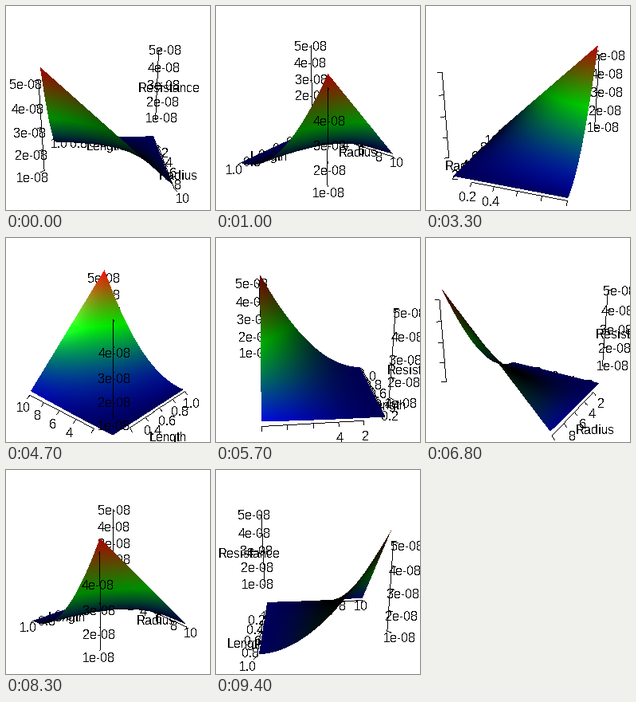
Write a matplotlib script that moves like this. It is 256 px wide and 256 px high and loops after 9.5 s.

```python
import numpy as np
import matplotlib.pyplot as plt
from matplotlib.animation import FuncAnimation

plt.rcParams.update({"text.antialiased": False, "text.hinting": "native",
                     "text.hinting_factor": 1})

SIZE = 256
FRAMES, INTERVAL = 95, 100
START, STEP = 87.7, 4.8              # camera azimuth in degrees
TILT = np.radians(20)
HALF_FOV = np.radians(15)
RADIUS = np.sqrt(3) / 2              # bounding sphere of the unit cube
DIST = RADIUS / np.sin(HALF_FOV)
NEAR, FAR = DIST - RADIUS, DIST + RADIUS
SCALE = SIZE / 2 / np.tan(HALF_FOV)
CX, CY = SIZE / 2, SIZE / 2 + 0.5
BOX = 0.515                          # half width of the axis box
TICK, LABEL, TITLE = 1.05, 1.15, 1.30
BASELINE = 7.5
LAYERS = 18

LENGTH = (0.02, 1.0)
RAD = (0.2, 10.0)
RES = (0.0, 5.5e-8)


def unit(value, bounds):
    return (value - bounds[0]) / (bounds[1] - bounds[0]) - 0.5


def camera(frame):
    """Right, up and towards-viewer vectors."""
    a = np.radians(START - STEP * frame)
    c, s = np.cos(a), np.sin(a)
    ct, st = np.cos(TILT), np.sin(TILT)
    return np.array([[-s, c, 0], [-c * st, -s * st, ct], [c * ct, s * ct, st]])


def project(points, cam):
    x, y, z = cam @ points
    depth = DIST - z
    return CX + SCALE * x / depth, CY - SCALE * y / depth, depth


def cubic_roots(a, b, c):
    """Real roots of s^3 + a s^2 + b s + c as three rows, nan where missing."""
    q = (a * a - 3 * b) / 9
    r = (2 * a ** 3 - 9 * a * b + 27 * c) / 54
    disc = r * r - q ** 3
    roots = np.full((3, a.size), np.nan)
    one = disc >= 0
    big = -np.sign(r[one]) * np.cbrt(np.abs(r[one]) + np.sqrt(disc[one]))
    roots[0, one] = big + q[one] / big
    three = ~one
    root_q = np.sqrt(q[three])
    angle = np.arccos(np.clip(r[three] / root_q ** 3, -1, 1))
    for k in range(3):
        roots[k, three] = -2 * root_q * np.cos((angle + 2 * np.pi * k) / 3)
    return roots - a / 3


# Cube coordinates to (length, radius / 10, height), where height = length * radius^2
SPAN = np.array([LENGTH[1] - LENGTH[0], (RAD[1] - RAD[0]) / 10, 1.0])
LOW = np.array([LENGTH[0], RAD[0] / 10, 0.0])

rows, cols = np.mgrid[0:SIZE, 0:SIZE] + 0.5
ray_x = (cols.ravel() - CX) / SCALE
ray_y = (CY - rows.ravel()) / SCALE


def shade_surface(cam):
    """Cast a ray through each pixel centre; the light sits at the viewer."""
    eye = (DIST * cam[2] + 0.5) * SPAN + LOW
    rays = np.outer(cam[0], ray_x) + np.outer(cam[1], ray_y) - cam[2][:, None]
    l1, b1, h1 = rays * SPAN[:, None]
    l0, b0, h0 = eye
    c0 = l0 * b0 ** 2 - h0
    c1 = 2 * l0 * b0 * b1 + l1 * b0 ** 2 - h1
    c2 = l0 * b1 ** 2 + 2 * l1 * b0 * b1
    c3 = l1 * b1 ** 2
    with np.errstate(all="ignore"):
        depth = 1 / cubic_roots(c1 / c0, c2 / c0, c3 / c0)
        length, rad = l0 + l1 * depth, b0 + b1 * depth
        inside = ((depth > NEAR) & (depth < FAR) & (length >= LENGTH[0])
                  & (length <= LENGTH[1]) & (rad >= LOW[1]) & (rad <= 1))
    zbuf = np.where(inside, depth, np.inf).min(axis=0)
    hit = np.isfinite(zbuf)
    t = zbuf[hit]
    length, rad = l0 + l1[hit] * t, b0 + b1[hit] * t
    height = length * rad ** 2

    normal = np.array([-rad ** 2 * SPAN[0], -2 * length * rad * SPAN[1], np.ones_like(t)])
    normal /= np.linalg.norm(normal, axis=0)
    side = -np.sign((normal * rays[:, hit]).sum(axis=0))
    light = np.clip(side * (cam[2] @ normal), 0, 1)
    mix = 2 * height - 1
    base = np.array([np.clip(mix, 0, 1), 1 - np.abs(mix), np.clip(-mix, 0, 1)])
    image = np.zeros((SIZE * SIZE, 4), dtype=np.uint8)
    image[hit, :3] = 255 * np.clip(base * light + light ** 50, 0, 1).T
    return image.reshape(SIZE, SIZE, 4), zbuf.reshape(SIZE, SIZE)


def draw_line(image, zbuf, x, y, depth):
    """One-pixel line between two points, hidden behind nearer pixels."""
    n = int(max(abs(x[1] - x[0]), abs(y[1] - y[0]))) + 1
    t = np.linspace(0, 1, n + 1)
    col, row = (np.floor(v[0] + (v[1] - v[0]) * t).astype(int) for v in (x, y))
    z = depth[0] + (depth[1] - depth[0]) * t
    ok = (col >= 0) & (col < SIZE) & (row >= 0) & (row < SIZE) & (z > NEAR) & (z < FAR)
    col, row, z = col[ok], row[ok], z[ok]
    front = z < zbuf[row, col]
    image[row[front], col[front], :3] = 0
    zbuf[row[front], col[front]] = z[front]


fig = plt.figure(figsize=(SIZE / 100, SIZE / 100), dpi=100, facecolor="white")
ax = fig.add_axes([0, 0, 1, 1])
ax.set_xlim(0, SIZE)
ax.set_ylim(SIZE, 0)
ax.axis("off")

# Depth slices of the picture, so that labels can stand between them
edges = np.linspace(NEAR, FAR, LAYERS + 1)
blank = np.zeros((SIZE, SIZE, 4), dtype=np.uint8)
layers = [ax.imshow(blank, extent=(0, SIZE, SIZE, 0), interpolation="nearest",
                    aspect="auto", zorder=-(lo + hi) / 2)
          for lo, hi in zip(edges[:-1], edges[1:])]

texts, lines = [], []


def add_text(string, pos):
    art = ax.text(0, 0, string, family="Liberation Sans", fontsize=11.52,
                  color="black", ha="left", va="baseline")
    width = art.get_window_extent(fig.canvas.get_renderer()).width
    texts.append((art, np.array(pos), width))


def add_axis(axis, sides, ticks, labels, title=None):
    """Axis along one box edge; sides holds the signs of the other two."""
    def at(value, grow):
        p = [BOX * grow * s for s in sides]
        p.insert(axis, value)
        return p

    lines.append(np.array([at(ticks[0], 1), at(ticks[-1], 1)]).T)
    for value, label in zip(ticks, labels):
        lines.append(np.array([at(value, 1), at(value, TICK)]).T)
        add_text(label, at(value, LABEL))
    if title:
        add_text(title, at(0, TITLE))


steps = np.arange(1, 6)
res_ticks = unit(steps * 1e-8, RES)
res_labels = [f"{k}e-08" for k in steps]
add_axis(0, (-1, -1), unit(steps / 5, LENGTH), [f"{k / 5:.1f}" for k in steps], "Length")
add_axis(1, (-1, -1), unit(steps * 2, RAD), [str(2 * k) for k in steps], "Radius")
add_axis(2, (-1, -1), res_ticks, res_labels, "Resistance")
add_axis(2, (1, 1), res_ticks, res_labels)


def draw(frame):
    cam = camera(frame)
    image, zbuf = shade_surface(cam)
    for path in lines:
        draw_line(image, zbuf, *project(path, cam))
    for layer, lo, hi in zip(layers, edges[:-1], edges[1:]):
        part = image.copy()
        part[..., 3] = 255 * ((zbuf >= lo) & (zbuf < hi))
        layer.set_data(part)
    for art, pos, width in texts:
        x, y, depth = project(pos, cam)
        left, bottom = x - width / 2, y + BASELINE
        # a label vanishes whole once its start leaves the view
        art.set_visible(bool(0 <= left < SIZE and 0 <= bottom <= SIZE
                             and NEAR <= depth <= FAR))
        art.set_position((round(left), round(bottom)))
        art.set_zorder(-depth)
    return []


anim = FuncAnimation(fig, draw, frames=FRAMES, interval=INTERVAL,
                     repeat=True, repeat_delay=0, blit=False)
plt.show()
```
